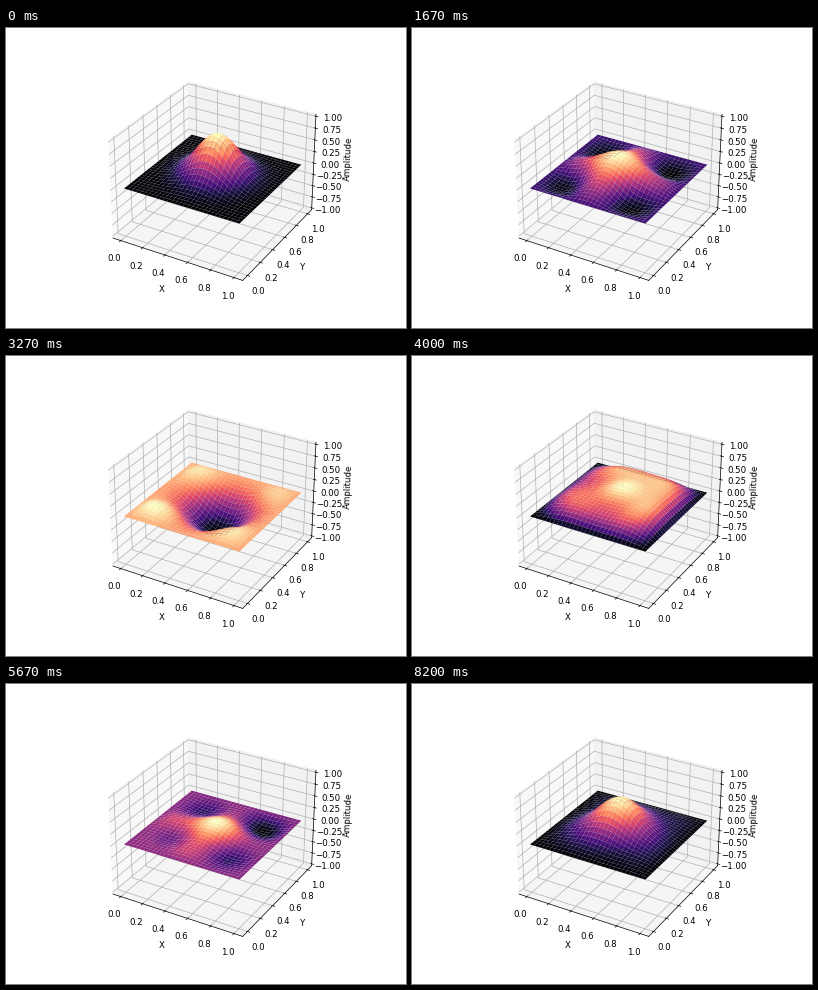
Recreate the animation shown at these times as a matplotlib script. Size 400x300 px, loop 8.27 s.

```python
import numpy as np
import matplotlib.pyplot as plt
from matplotlib.animation import FuncAnimation

N = 30               # grid points per side
FRAMES = 124
LOOP_MS = 8270
SUBSTEPS = 3
COURANT = 0.44       # c * dt / dx
WIDTH = 40           # spread of the initial bump, in cells squared


def simulate():
    """Leapfrog solution of the 2D wave equation with fixed edges."""
    i, j = np.indices((N, N)) - N // 2
    u = np.exp(-(i**2 + j**2) / WIDTH)
    u[[0, -1], :] = u[:, [0, -1]] = 0
    prev = u.copy()
    states = []
    for _ in range(FRAMES):
        for _ in range(SUBSTEPS):
            nxt = np.zeros_like(u)
            lap = (u[2:, 1:-1] + u[:-2, 1:-1] + u[1:-1, 2:] + u[1:-1, :-2]
                   - 4 * u[1:-1, 1:-1])
            nxt[1:-1, 1:-1] = (2 * u - prev)[1:-1, 1:-1] + COURANT**2 * lap
            prev, u = u, nxt
        states.append(u)
    return states


def quads(z):
    """Corner points of every grid cell, shape (cells, 4, 3)."""
    p = np.stack([X, Y, z], axis=-1)
    corners = [p[:-1, :-1], p[:-1, 1:], p[1:, 1:], p[1:, :-1]]
    return np.stack(corners, axis=2).reshape(-1, 4, 3)


X, Y = np.meshgrid(np.linspace(0, 1, N), np.linspace(0, 1, N))
waves = simulate()

fig = plt.figure(figsize=(6.4, 4.8), dpi=62.5)
ax = fig.add_subplot(projection="3d")
surf = ax.plot_surface(X, Y, waves[0], cmap="magma")
ax.set_zlim(-1, 1, view_margin=1 / 48)
ax.set_xlabel("X")
ax.set_ylabel("Y")
ax.set_zlabel("Amplitude")


def update(frame):
    cells = quads(waves[frame])
    surf.set_verts(cells)
    surf.set_array(cells[:, :, 2].mean(axis=1))
    surf.autoscale()
    return (surf,)


anim = FuncAnimation(fig, update, frames=FRAMES, interval=LOOP_MS / FRAMES,
                     repeat=True, repeat_delay=0, blit=False)
plt.show()
```
